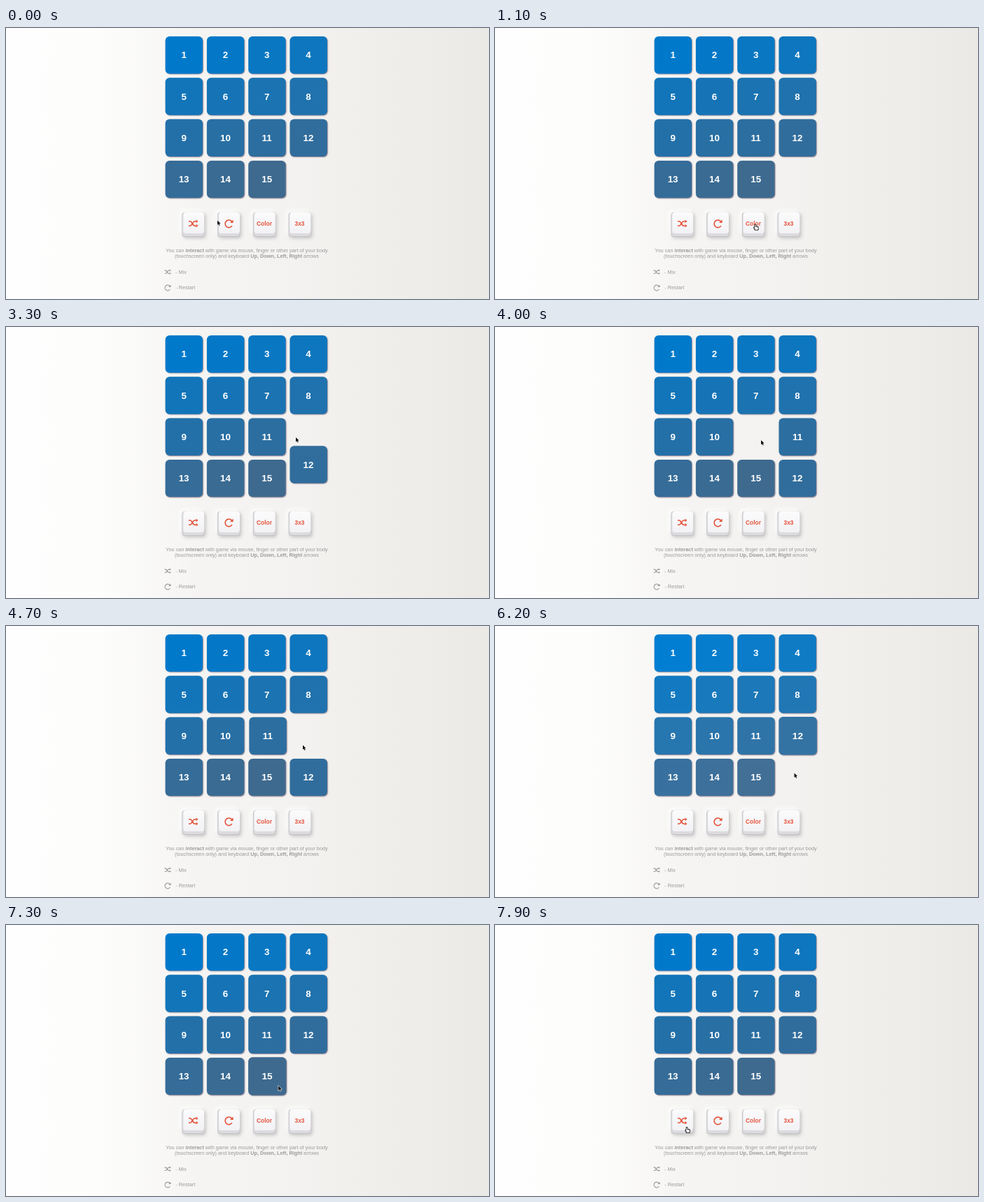
An HTML page with a canvas for the animation above (8 s loop, 690 by 388 pixels).

```html
<!DOCTYPE html>
<html lang="en">
<head>
<meta charset="utf-8">
<title>Fifteen puzzle</title>
<style>
html, body { margin: 0; width: 100%; height: 100%; overflow: hidden; background: #f3f2f0; }
canvas { display: block; width: 690px; height: 388px; }
</style>
</head>
<body>
<canvas id="stage" width="690" height="388"></canvas>
<script>
const ctx = document.getElementById('stage').getContext('2d');
const LOOP = 8000, STEP = 100, SLIDE = 200;
const SIZE = 53.4, PITCH = 59.3, LEFT = 227.6, TOP = 12;
const RED = '#e4553d', GREY = '#9c9b9a', PALE = '#999897';
const FONT = '"Liberation Sans", Arial, sans-serif';

const clamp = v => Math.max(0, Math.min(1, v));
const mix = (a, b, p) => a + (b - a) * p;
const blend = (a, b, p) => a.map((v, i) => mix(v, b[i], p));
const easeOut = p => 1 - (1 - p) ** 2;
const wave = p => (1 - Math.cos(Math.PI * p)) / 2;

// pointer moves: start, end, destination
const moves = [
  [0, 800, 372, 281], [1000, 2200, 365, 292.5], [2200, 2700, 483, 277],
  [2800, 3100, 414, 158], [3300, 3600, 380, 162], [4000, 4400, 424, 170.6],
  [4700, 5100, 378, 209], [5500, 5800, 427.5, 210.5], [7000, 7900, 274, 289.5]
];
const clicks = [3215, 3750, 4528, 5930];
const slides = [];

function pointerAt(t) {
  return moves.reduce((pos, [start, end, ...to]) =>
    blend(pos, to, wave(clamp((t - start) / (end - start)))), [302, 275.5]);
}

function cellOf(n, t) {
  let cell = [(n - 1) % 4, Math.floor((n - 1) / 4)];
  for (const s of slides) {
    if (s.n === n) cell = blend(cell, s.to, easeOut(clamp((t - s.start) / SLIDE)));
  }
  return cell;
}

function tileUnder(t) {
  const [x, y] = pointerAt(t);
  for (let n = 1; n <= 15; n++) {
    const [col, row] = cellOf(n, t);
    const dx = x - LEFT - col * PITCH, dy = y - TOP - row * PITCH;
    if (dx >= 0 && dx <= SIZE && dy >= 0 && dy <= SIZE) return n;
  }
}

// a resting pointer keeps the tile it arrived on highlighted
function hoveredAt(t) {
  const [, end] = moves.filter(m => m[0] <= t).pop();
  return tileUnder(Math.min(t, end));
}

// each click sends the tile under the pointer into the hole
function play() {
  let hole = [3, 3];
  for (const start of clicks) {
    const n = tileUnder(start), from = cellOf(n, start);
    slides.push({ n, start, to: hole });
    hole = from;
  }
}

function flashAt(t) {
  return wave(clamp((t - 6140) / 260)) * (1 - wave(clamp((t - 6400) / 450)));
}

function box(x, y, w, h, r, fill) {
  ctx.beginPath();
  ctx.roundRect(x, y, w, h, r);
  ctx.fillStyle = fill;
  ctx.fill();
}

function shadow(color, blur, offset) {
  ctx.shadowColor = color;
  ctx.shadowBlur = blur;
  ctx.shadowOffsetX = ctx.shadowOffsetY = offset;
}

const noShadow = () => shadow('transparent', 0, 0);

function gradient(x, y, ...colors) {
  const g = ctx.createLinearGradient(0, 0, x, y);
  colors.forEach((c, i) => g.addColorStop(i / (colors.length - 1), c));
  return g;
}

function label(str, x, y, size, color) {
  ctx.font = `bold ${size}px ${FONT}`;
  ctx.textAlign = 'center';
  ctx.fillStyle = color;
  ctx.fillText(str, x, y);
}

// every second part is bold
function richLine(parts, cx, y) {
  const font = i => `${i % 2 ? 'bold ' : ''}7.3px ${FONT}`;
  const widths = parts.map((s, i) => {
    ctx.font = font(i);
    return ctx.measureText(s).width;
  });
  let x = cx - widths.reduce((a, b) => a + b) / 2;
  ctx.textAlign = 'left';
  ctx.fillStyle = GREY;
  parts.forEach((s, i) => {
    ctx.font = font(i);
    ctx.fillText(s, x, y);
    x += widths[i];
  });
}

function polygon(...pts) {
  ctx.beginPath();
  pts.forEach(p => ctx.lineTo(...p));
  ctx.closePath();
}

function icon(draw, x, y, scale, color) {
  ctx.save();
  ctx.translate(x, y);
  ctx.scale(scale, scale);
  ctx.fillStyle = ctx.strokeStyle = color;
  ctx.lineWidth = 1.6;
  draw();
  ctx.restore();
}

function shuffleIcon() {
  for (const s of [1, -1]) {
    ctx.beginPath();
    ctx.moveTo(-6.8, -3.2 * s);
    ctx.lineTo(-4.4, -3.2 * s);
    ctx.bezierCurveTo(-2, -3.2 * s, -1, 3.2 * s, 2, 3.2 * s);
    ctx.lineTo(4, 3.2 * s);
    ctx.stroke();
    polygon([3.8, 3.2 * s - 2.4], [6.8, 3.2 * s], [3.8, 3.2 * s + 2.4]);
    ctx.fill();
  }
}

function restartIcon() {
  ctx.beginPath();
  ctx.arc(0, 0, 5.3, 0.55, -0.6);
  ctx.stroke();
  polygon([6.2, -5.9], [6.2, -1.3], [1.6, -1.3]);
  ctx.fill();
}

function background() {
  ctx.fillStyle = gradient(690, 0, '#fefefe', '#fdfdfc', '#f5f4f2', '#f3f2f0', '#efeeeb', '#eae9e6');
  ctx.fillRect(0, 0, 690, 388);
}

function button(x, y) {
  ctx.save();
  ctx.translate(x, y);
  shadow('#ffffff', 7, -3);
  box(0, 0, 32, 34, 4, '#f4f4f5');
  shadow('rgba(125,120,120,.4)', 5, 2);
  box(0, 0, 32, 35, 4, '#c3c2c5');
  noShadow();
  box(0.7, 0.3, 30.8, 33.6, 4, '#dcdbdf');
  box(1.8, 0, 30, 30, 4, gradient(0, 30, '#fbfbfc', '#f2f2f5'));
  ctx.restore();
}

function controls() {
  for (let i = 0; i < 4; i++) button(251.5 + 50.7 * i, 264);
  icon(shuffleIcon, 267.7, 280, 1, RED);
  icon(restartIcon, 318.4, 280.3, 1, RED);
  label('Color', 369, 283.1, 8.4, RED);
  label('3x3', 419.5, 283.1, 8.4, RED);
  richLine(['You can ', 'interact', ' with game via mouse, finger or other part of your body'], 344, 320.8);
  richLine(['(touchscreen only) and keyboard ', 'Up, Down, Left, Right', ' arrows'], 344, 328.9);
  icon(shuffleIcon, 231.2, 349.3, 0.68, PALE);
  icon(restartIcon, 231, 372, 0.74, PALE);
  richLine(['- Mix'], 250, 351.8);
  richLine(['- Restart'], 256.2, 374.4);
}

function tile(n, t, hot, flash) {
  const [col, row] = cellOf(n, t);
  const k = (n - 1) / 14;
  const calm = blend([0, 121, 203], [62, 106, 143], k);
  const lit = blend([8, 164, 255], [87, 148, 200], k);
  ctx.save();
  ctx.translate(LEFT + col * PITCH + SIZE / 2, TOP + row * PITCH + SIZE / 2);
  if (hot) {
    ctx.translate(0.4, 0);
    ctx.scale(1.02, 1.02);
  }
  shadow('rgba(75,55,80,.6)', 1.5, 0.9);
  box(-SIZE / 2, -SIZE / 2, SIZE, SIZE, 6, `rgb(${blend(calm, lit, flash).map(Math.round)})`);
  noShadow();
  label(n, -0.2, 4.6, 13.4, '#fff');
  ctx.restore();
}

function arrow() {
  ctx.scale(0.88, 0.88);
  polygon([0, 0], [0, 7.4], [1.7, 5.9], [2.9, 8.6], [4.2, 8], [3, 5.4], [5.3, 5.2]);
  ctx.lineWidth = 1.2;
  ctx.strokeStyle = 'rgba(255,255,255,.9)';
  ctx.stroke();
  ctx.fillStyle = '#111';
  ctx.fill();
}

function hand() {
  for (const [grow, color] of [[0.5, '#222'], [-0.4, '#fff']]) {
    const part = (x, y, w, h, r) =>
      box(x - grow, y - grow, w + 2 * grow, h + 2 * grow, r, color);
    part(-0.9, 0, 1.9, 5.5, 1);
    part(-2, 3.6, 3, 2.4, 1);
    part(-0.9, 3.1, 5.2, 5, 1.6);
  }
}

function cursor(t) {
  const [x, y] = pointerAt(t);
  const along = (x - 253) % 50.7;
  const over = y > 265 && y < 292 && x < 435 && along > 0 && along < 30 && x > 303;
  const onMix = y > 265 && y < 292 && x > 253 && x < 283;
  ctx.save();
  ctx.translate(x, y);
  (over || onMix ? hand : arrow)();
  ctx.restore();
}

function frame(now) {
  const t = Math.floor((now % LOOP) / STEP) * STEP;
  const hot = hoveredAt(t), flash = flashAt(t);
  background();
  controls();
  for (let n = 1; n <= 15; n++) tile(n, t, n === hot, flash);
  cursor(t);
  requestAnimationFrame(frame);
}

play();
requestAnimationFrame(frame);
</script>
</body>
</html>
```
